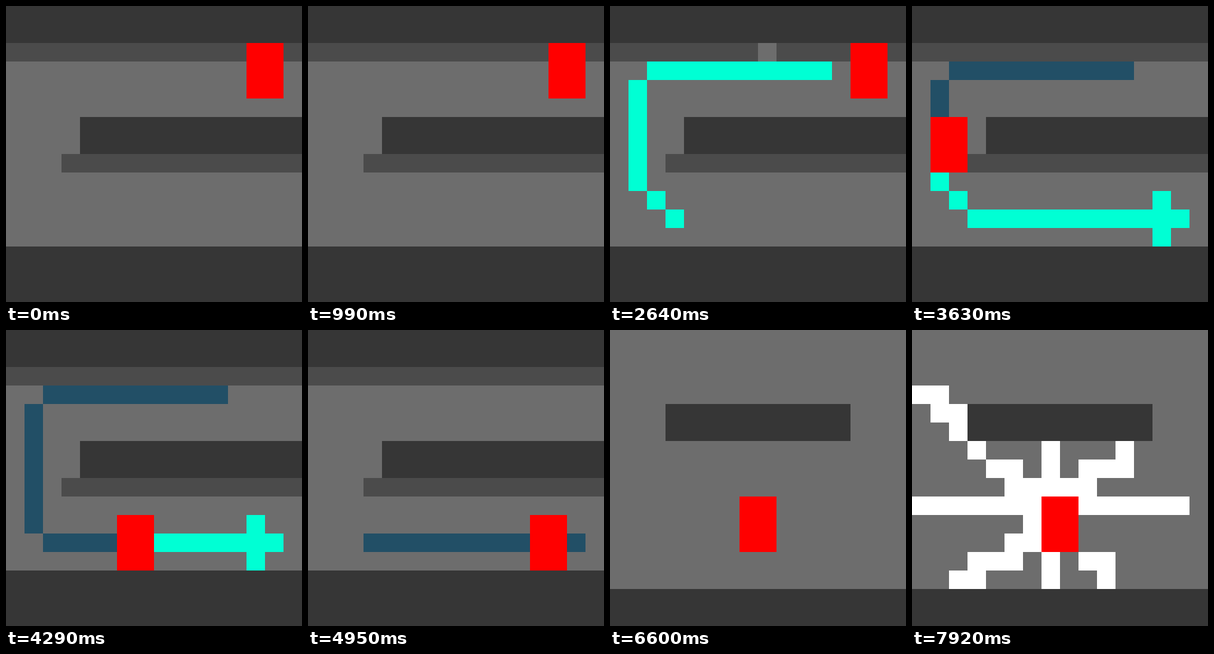
Recreate the animation shown at these times as an HTML page with a canvas. Size 512x512 px, loop 8 s.

```html
<!DOCTYPE html>
<html lang="en">
<head>
<meta charset="utf-8">
<title>Path and pulse</title>
<style>
  html, body { margin: 0; height: 100%; overflow: hidden; background: #6d6d6d; }
  canvas { display: block; }
</style>
</head>
<body>
<canvas id="stage" width="512" height="512"></canvas>
<script>
const ctx = document.getElementById('stage').getContext('2d');
const CELL = 32, STEP = 330, LOOP = 8000, ROOM_START = 20;
const FLOOR = '#6d6d6d', WALL = '#363636', EDGE = '#4b4b4b';
const RED = '#ff0000', CYAN = '#00ffd4', BLUE = '#224f66', WHITE = '#ffffff';

function fill(color, x, y, w = 1, h = 1) {
  ctx.fillStyle = color;
  ctx.fillRect(x * CELL, y * CELL, w * CELL, h * CELL);
}

// All cells along a line through the given corners, one king's move at a time.
function trace([[x, y], ...corners]) {
  const cells = [[x, y]];
  for (const [endX, endY] of corners)
    while (x !== endX || y !== endY) {
      x += Math.sign(endX - x);
      y += Math.sign(endY - y);
      cells.push([x, y]);
    }
  return cells;
}

const paint = (color, cells) => cells.forEach(([x, y]) => fill(color, x, y));

// Value in a list that starts at the given step and holds its last entry.
const valueAt = (list, first, step) => list[Math.min(step - first, list.length - 1)] ?? 0;

const plan = trace([[11, 3], [2, 3], [1, 4], [1, 9], [3, 11], [14, 11]]);
const walk = trace([[11, 3], [2, 3], [1, 4], [1, 10], [2, 11], [14, 11]]);
const stops = [[9, 2], [1, 6], [2, 10], [6, 10], [12, 10]];

const rays = [
  [[9, 8], [5, 8], [5, 7], [4, 7], [2, 5], [2, 4], [1, 4], [1, 3], [0, 3]],
  [[7, 7], [7, 6]],
  [[9, 7], [11, 7], [11, 6]],
  [[0, 9], [14, 9]],
  [[6, 10], [6, 11], [5, 11], [5, 12], [3, 12], [3, 13], [2, 13]],
  [[7, 12], [7, 13]],
  [[9, 12], [10, 12], [10, 13]],
].flatMap(trace);

function drawCorridor(step) {
  fill(WALL, 0, 0, 16, 2);
  fill(EDGE, 0, 2, 16);
  fill(WALL, 4, 6, 12, 2);
  fill(EDGE, 3, 8, 13);
  fill(WALL, 0, 13, 16, 3);

  // Path cells planned, walked and faded so far
  const planned = valueAt([3, 4, 10, 16, 18, 29], 4, step);
  const walked = valueAt([1, 12, 16, 21, 30], 10, step);
  const faded = valueAt([8, 18, 25, 30], 14, step);
  const sweeping = step >= 6 && step <= 8;

  if (step >= 6 && step <= 10) fill(FLOOR, 8, 2);
  paint(CYAN, plan.slice(walked, planned));
  paint(BLUE, walk.slice(faded, walked));
  if (planned > walked && !sweeping) {
    const [x, y] = plan[planned - 2];
    fill(CYAN, x, y - 1, 1, 3);
  }

  const [x, y] = valueAt(stops, 10, step) || [13, 2];
  fill(step === 2 ? CYAN : RED, x, y, 2, 3);
}

function drawRoom(step) {
  const reach = 3.1 * (step - ROOM_START - 1) - 0.85;
  paint(WHITE, rays.filter(([x, y]) =>
    Math.max(Math.abs(x - 7.3), 1.1 * Math.abs(y - 10)) < reach));
  fill(WALL, 3, 4, 10, 2);
  fill(WALL, 0, 14, 16, 2);
  fill(RED, 7, 9, 2, 3);
}

const start = performance.now();
function tick() {
  const step = Math.floor((performance.now() - start) % LOOP / STEP);
  fill(FLOOR, 0, 0, 16, 16);
  (step < ROOM_START ? drawCorridor : drawRoom)(step);
  requestAnimationFrame(tick);
}
tick();
</script>
</body>
</html>
```
